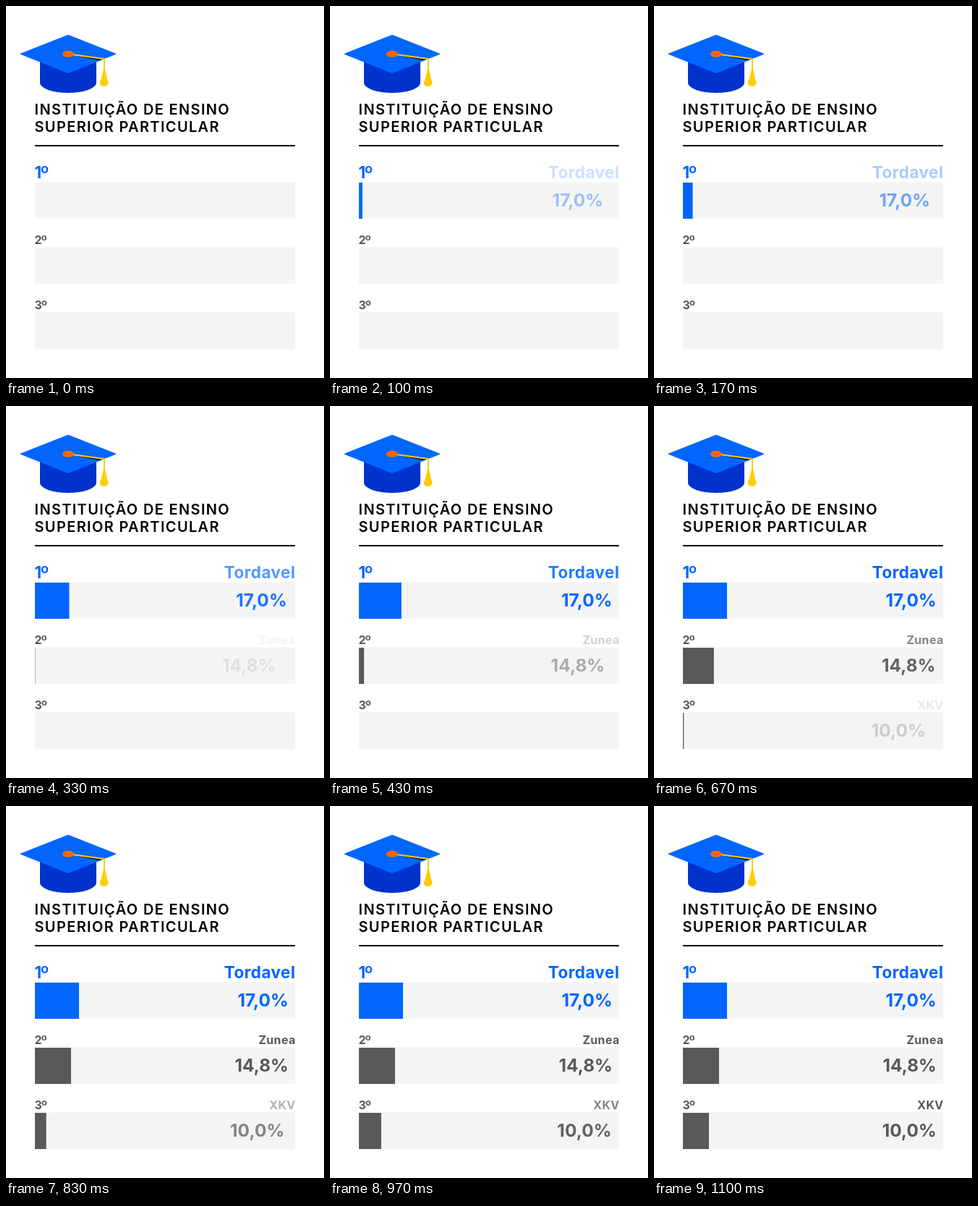
These frames come from a looping animation (440 px wide and 514 px high, 1.13 s). An HTML page:

```html
<!DOCTYPE html>
<html lang="pt-BR">
<head>
<meta charset="utf-8">
<title>Instituição de ensino superior particular</title>
<style>
  html, body { margin: 0; width: 100%; height: 100%; overflow: hidden; background: #fff; }
  svg { display: block; width: 440px; height: 514px; }
  text { font-family: Inter, Roboto, sans-serif; font-weight: 700; }
  .title { font-size: 20px; font-weight: 600; letter-spacing: 1.35px; }
  .rank { letter-spacing: -0.05em; }
  .name { letter-spacing: 0.02em; }
  .name, .pct { text-anchor: end; }
  .pct { font-size: 24.5px; }
</style>
</head>
<body>
<svg id="stage" viewBox="0 0 440 514" xmlns="http://www.w3.org/2000/svg">
  <g id="cap">
    <path d="M47 70V106A39 14 0 0 0 125 106V70Z" fill="#03c"/>
    <path d="M20.500 65.500L84.500 40.300Q86 39.700 87.500 40.300L151.500 65.500Q153 66.200 151.500 67L87.500 92.400Q86 93 84.500 92.400L20.500 67Q19 66.200 20.500 65.500Z" fill="#06f"/>
    <path d="M98 69L134 73.500L129 75Z" fill="#013"/>
    <path d="M88 66.500L136 73V92" fill="none" stroke="#fc0" stroke-width="2" stroke-linejoin="round"/>
    <ellipse cx="86" cy="66.300" rx="8" ry="4.500" fill="#f60"/>
    <path d="M135 87H137L138.500 93C139 99 141 103 142 107L140 108V110C137 111.800 132 111.500 130 108C130 103 133 99 133.500 93Z" fill="#fc0"/>
  </g>
  <text class="title" x="39.500" y="149.500">INSTITUIÇÃO DE ENSINO</text>
  <text class="title" x="39.500" y="173.500">SUPERIOR PARTICULAR</text>
  <rect x="40" y="192" width="360" height="2"/>
</svg>
<script>
const LOOP = 1130, SPAN = 15, GREY = '#58595b', BLUE = '#06f';
const stage = document.getElementById('stage');

const table = [
  { rank: '1º', name: 'Tordavel', pct: '17,0%', bar: 61, start: 0, size: 22.5, color: BLUE, base: 237.5 },
  { rank: '2º', name: 'Zunea', pct: '14,8%', bar: 50, start: 9, size: 16, color: GREY, base: 329 },
  { rank: '3º', name: 'XKV', pct: '10,0%', bar: 36, start: 18, size: 16, color: GREY, base: 419 }
];

function add(tag, attrs, label = '') {
  const el = document.createElementNS(stage.namespaceURI, tag);
  for (const key in attrs) el.setAttribute(key, attrs[key]);
  el.textContent = label;
  return stage.appendChild(el);
}

const rows = table.map((row, i) => {
  const top = 243.5 + 90 * i;
  const type = { y: row.base, fill: row.color, 'font-size': row.size };
  add('rect', { x: 40, y: top, width: 360, height: 50, fill: '#f4f4f4' });
  add('text', { ...type, x: 39.5, class: 'rank' }, row.rank);
  return {
    ...row,
    fill: add('rect', { x: 40, y: top + 0.5, width: 0, height: 50, fill: row.color }),
    label: add('text', { ...type, x: 400.5, class: 'name' }, row.name),
    value: add('text', { x: 391, y: top + 33, fill: row.color, class: 'pct' }, row.pct)
  };
});

const clamp = p => Math.min(1, Math.max(0, p));
const easeOut = p => 1 - (1 - p) ** 2;
const easeInOut = p => p < 0.5 ? 2 * p * p : 1 - 2 * (1 - p) ** 2;

function draw(ms) {
  // 30 steps per second, starting on whole hundredths
  const step = Math.floor((Math.floor(ms / 10) + 0.5) * 0.3);
  for (const row of rows) {
    const p = clamp((step - row.start) / SPAN);
    row.fill.setAttribute('width', row.bar * easeInOut(p));
    row.label.setAttribute('opacity', p);
    row.value.setAttribute('opacity', easeOut(p));
    row.value.setAttribute('transform', `translate(${-20 * (1 - easeOut(p))} 0)`);
  }
}

const begin = performance.now();
function tick() {
  draw((performance.now() - begin) % LOOP);
  requestAnimationFrame(tick);
}
tick();
</script>
</body>
</html>
```
